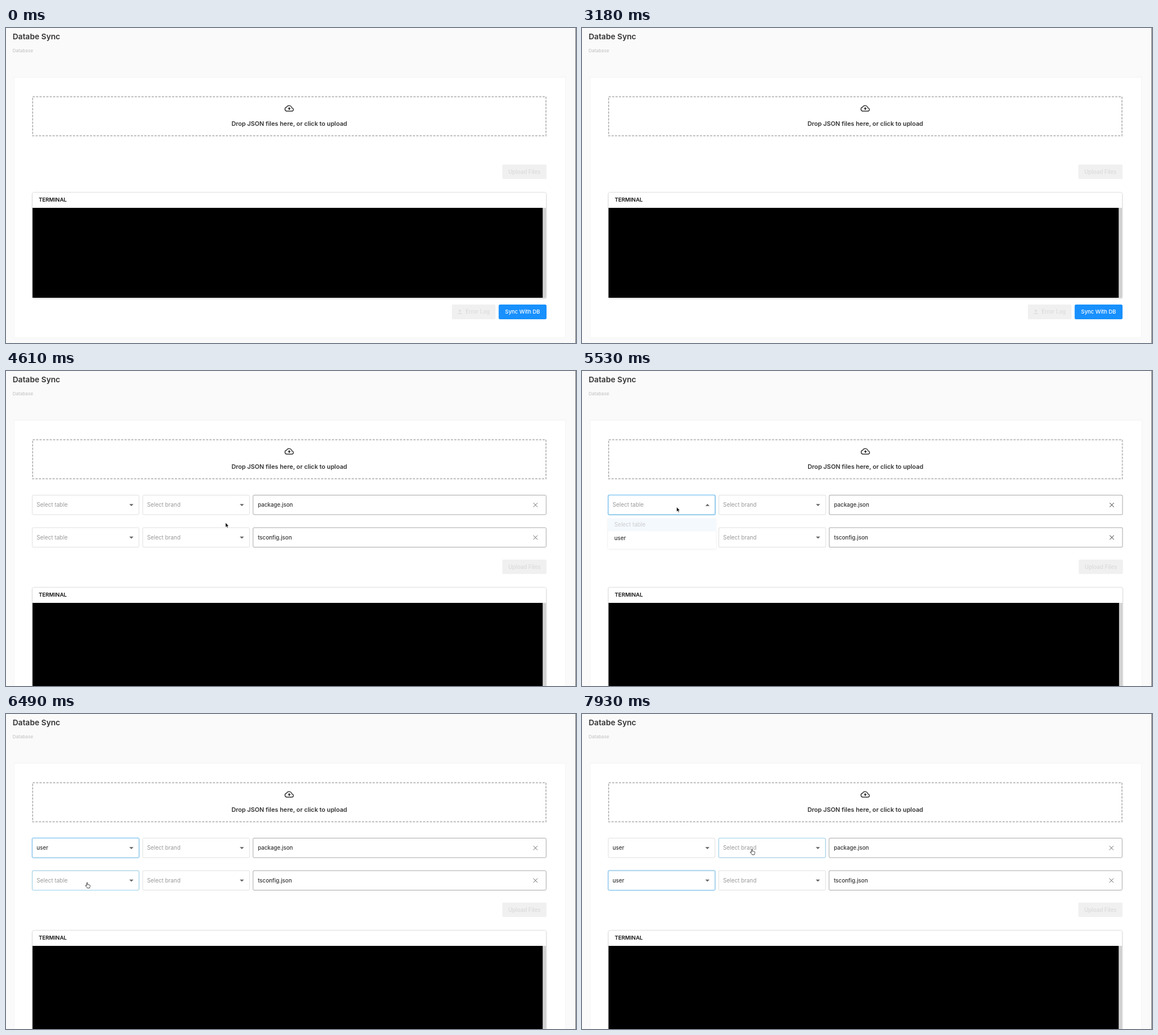
An HTML page for the animation above (8 s loop, 1006 by 557 pixels).

```html
<!DOCTYPE html>
<html lang="en">
<head>
<meta charset="utf-8">
<title>Databe Sync</title>
<style>
  html, body { margin: 0; height: 100%; overflow: hidden; background: #fafafa; }
  svg { display: block; width: 100vw; height: 100vh; }
  text { font: 500 9.7px Inter, "Open Sans", sans-serif; fill: #333; white-space: pre; }
  .hint { fill: #999; font-weight: 400; font-size: 9.9px; }
  .off { fill: #dadada; }
  .box { fill: #fff; stroke: #e0e0e0; }
  .file { fill: #fff; stroke: #a8a8a8; }
  .shadow { filter: drop-shadow(0 1px 1px #0002); }
</style>
</head>
<body>
<svg id="stage" viewBox="0 0 1006 557"></svg>
<script>
const LOOP = 8000, SHIFT = 92;
const ROWS = [219.5, 277], COLS = [46.3, 241.3], SEL_W = 188.5, SEL_H = 34.5;

const rect = (x, y, w, h, attrs = '') =>
  `<rect x="${x}" y="${y}" width="${w}" height="${h}" ${attrs}/>`;
const text = (x, y, str, attrs = '') => `<text x="${x}" y="${y}" ${attrs}>${str}</text>`;

const select = (row, col) => {
  const x = COLS[col], y = ROWS[row], id = `${row}${col}`;
  return rect(x, y, SEL_W, SEL_H, 'rx="2" class="box"') +
    rect(x, y, SEL_W, SEL_H, `id="hover${id}" rx="2" fill="none" stroke="#98d0ea"`) +
    `<g id="focus${id}" fill="none">` +
    rect(x - 1, y - 1, SEL_W + 2, SEL_H + 2, 'rx="3" stroke="#1890ff" stroke-opacity=".17"') +
    rect(x, y, SEL_W, SEL_H, 'rx="2" stroke="#7cc3ee"') + '</g>' +
    text(x + 7.6, y + 20.6, col ? 'Select brand' : 'Select table', `id="value${id}" class="hint"`) +
    `<path id="caret${id}" d="M-3.7-1.8H3.7L0 2Z" fill="#666" transform="translate(${x + 175} ${y + 17.5})"/>`;
};

const fileRow = (row, name) => {
  const y = ROWS[row];
  return select(row, 0) + select(row, 1) +
    rect(436, y, 517.3, SEL_H, 'rx="2" class="file"') +
    text(444.4, y + 20.6, name) +
    `<path d="M930.7 ${y + 13.7}l7.4 7.4m0-7.4l-7.4 7.4" stroke="#666"/>`;
};

const menu = row => {
  const y = ROWS[row];
  return `<g id="menu${row}">` +
    rect(46, y + 38.5, 190, 56, 'rx="2" fill="#fff" style="filter:drop-shadow(0 1px 2px #0001)"') +
    rect(46, y + 41, 190, 23, 'fill="#f4f9fe"') +
    rect(46, y + 64, 190, 24, `id="option${row}" fill="#f5f5f5"`) +
    text(57, y + 55.6, 'Select table', 'class="hint" style="fill:#ccc"') +
    text(57, y + 79.6, 'user') + '</g>';
};

const stage = document.getElementById('stage');
stage.innerHTML =
  rect(0, 0, 1006, 557, 'fill="#fafafa"') +
  text(11.7, 19.8, 'Databe Sync', 'style="font-size:13.7px;font-weight:600"') +
  text(11.7, 43, 'Database', 'style="font-size:8px;fill:#c6c6c6"') +
  '<g id="content">' +
  rect(14.5, 87, 973, 461, 'id="card" fill="#fff" stroke="#f4f4f4"') +
  rect(47, 121.5, 906, 69, 'fill="none" stroke="#bdbdbd" stroke-width="2" stroke-dasharray="4 2"') +
  '<g transform="translate(491.4 133.5) scale(.71)" fill="none" stroke="#333" stroke-width="2">' +
  '<path d="M6 19a5 5 0 0 1-.6-9.9 7 7 0 0 1 13.1 2A4 4 0 0 1 19 19Z"/>' +
  '<path d="M12 9l-4 4h2.5v3h3v-3H16Z" fill="#333" stroke="none"/></g>' +
  text(500, 173.4, 'Drop JSON files here, or click to upload',
    'text-anchor="middle" style="font-size:10.8px;font-weight:600"') +
  '<g id="lower">' +
  rect(876, 241.5, 78, 25.5, 'rx="2" fill="#f0f0f0"') +
  text(915, 257.6, 'Upload Files', 'text-anchor="middle" class="off"') +
  rect(46.5, 290.5, 907, 187, 'rx="3" fill="#fff" stroke="#e0e0e0" class="shadow"') +
  text(57.7, 307.2, 'TERMINAL', 'style="font-size:9.6px;font-weight:600;fill:#111"') +
  rect(947, 318, 6.3, 159, 'fill="#d2d2d2"') +
  rect(46.8, 318, 900.4, 159, 'fill="#000"') +
  rect(787, 489, 77, 26, 'rx="2" fill="#f0f0f0"') +
  '<path d="M797.5 505h7M801 503v-4.5m-2 2l2-2 2 2" fill="none" stroke="#d4d4d4"/>' +
  text(811, 505.2, 'Error Log', 'class="off"') +
  rect(869.5, 489, 84.5, 26, 'rx="2.5" fill="#1890ff"') +
  text(911.7, 505.2, 'Sync With DB', 'text-anchor="middle" style="font-size:9.5px;fill:#fff"') +
  '</g>' +
  `<g id="rows">${fileRow(0, 'package.json')}${fileRow(1, 'tsconfig.json')}</g>` +
  menu(0) + menu(1) + '</g>' +
  rect(1005, 0, 1, 557, 'fill="#707070"') +
  '<g id="cursor">' +
  '<path id="arrow" d="M0 0V8.4L2 6.7 3.3 9.7 4.7 9.1 3.4 6.2H6Z" fill="#000" stroke="#fff" stroke-width=".7"/>' +
  '<path id="hand" transform="translate(-3.8 -.4)" d="M3 6V1.2a.8.8 0 0 1 1.6 0V4.2q.9-.6 1.5.2 1-.5 1.5.3 1.2-.3 1.3.9V7q0 1.2-.8 2v1.2H4V9.4Q2.6 8.4.8 6.2 .6 5 1.8 5.2Z" fill="#fff" stroke="#222" stroke-width=".85"/>' +
  '</g>';

const el = {};
stage.querySelectorAll('[id]').forEach(node => el[node.id] = node);

const show = (id, opacity) => el[id].setAttribute('opacity', +opacity);
const move = (id, transform) => el[id].setAttribute('transform', transform);
const ramp = (t, start, length = 200) => Math.min(1, Math.max(0, (t - start) / length));
const within = (t, a, b) => t >= a && t < b;

// start, end, x, y, downward sag of the path
const MOVES = [
  [0, 1, 537, 525, 0],
  [40, 520, 528.5, 150.5, 0],
  [3420, 3421, 609.3, 245.5, 0],
  [4210, 5010, 167, 240.5, 25],
  [5530, 5890, 132, 294, 0],
  [6050, 6490, 143.3, 298, 0],
  [6490, 6850, 134, 306, 0],
  [6890, 7210, 107, 350, 0],
  [7450, 7930, 300, 239, 0]
];
// open, close and blur times of each table menu
const MENUS = [[5050, 6050, 6650], [6650, 7450, LOOP + 1]];
const ARROW_SPANS = [[810, 3500], [5050, 5560], [6650, 6890]];

function pointer(t) {
  const i = Math.max(1, MOVES.findLastIndex(m => t >= m[0]));
  const [, , x0, y0] = MOVES[i - 1], [start, end, x1, y1, sag] = MOVES[i];
  const p = ramp(t, start, end - start), e = p * p * (3 - 2 * p);
  return [x0 + (x1 - x0) * e, y0 + (y1 - y0) * e + sag * Math.sin(Math.PI * e)];
}

function draw(t) {
  const [x, y] = pointer(t);
  const inside = (left, top, w, h) => x >= left && x <= left + w && y >= top && y <= top + h;
  const hasRows = t >= 3340;
  const opened = MENUS.findIndex(([open, close]) => within(t, open, close));
  let clickable = inside(46, 120.5, 908, 71);

  show('rows', hasRows);
  move('lower', `translate(0 ${hasRows ? SHIFT : 0})`);
  el.card.setAttribute('height', 461 + (hasRows ? SHIFT : 0));
  // an open menu removes the page scrollbar, so the content widens slightly
  move('content', `scale(${opened >= 0 ? 1.0007 : 1} 1)`);

  MENUS.forEach(([open, close, blur], row) => {
    const top = ROWS[row];
    const visible = ramp(t, open) - ramp(t, close);
    show('menu' + row, visible);
    const squash = 0.8 + 0.2 * visible;
    move('menu' + row, `translate(0 ${(top + 38.5) * (1 - squash)}) scale(1 ${squash})`);

    const onOption = opened === row && inside(46, top + 64, 190, 24);
    show('option' + row, onOption);
    clickable ||= onOption;

    COLS.forEach((left, col) => {
      const covered = opened === 0 && row === 1 && col === 0;
      const hovered = hasRows && !covered && inside(left, top, SEL_W, SEL_H);
      show(`hover${row}${col}`, hovered);
      show(`focus${row}${col}`, col ? 0 : ramp(t, open) - ramp(t, blur));
      clickable ||= hovered;
    });

    const chosen = t >= close, value = el[`value${row}0`];
    value.textContent = chosen ? 'user' : 'Select table';
    value.setAttribute('class', chosen ? '' : 'hint');
    move(`caret${row}0`, `translate(${COLS[0] + 175} ${top + 17.5}) scale(1 ${1 - 2 * visible})`);
  });

  const hand = clickable && !ARROW_SPANS.some(([a, b]) => within(t, a, b));
  show('cursor', within(t, 40, 3180) || t >= 3420);
  show('hand', hand);
  show('arrow', !hand);
  move('cursor', `translate(${x} ${y})`);
}

const begin = performance.now();
function tick() {
  draw((performance.now() - begin) % LOOP);
  requestAnimationFrame(tick);
}
tick();
</script>
</body>
</html>
```
